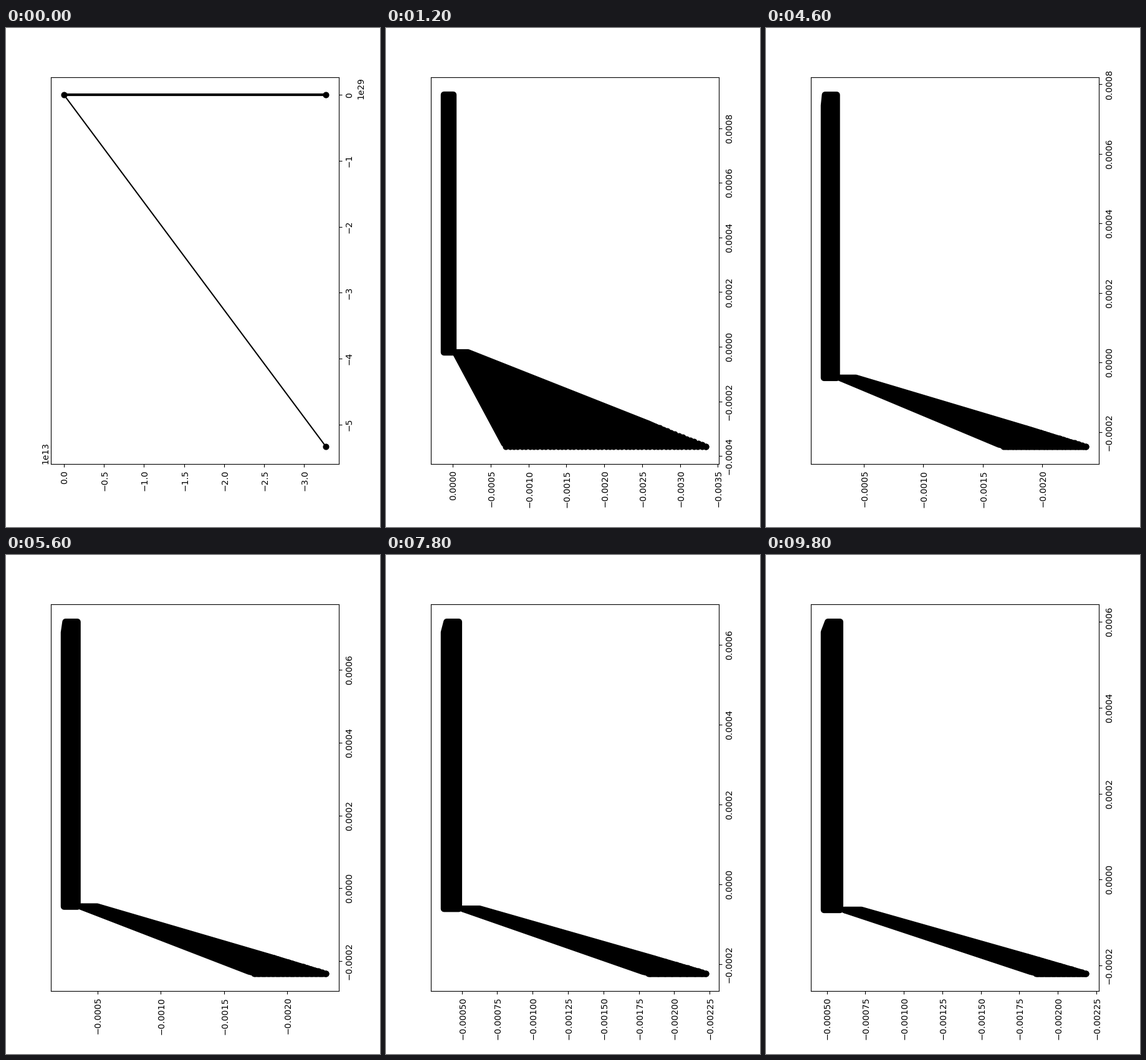
Animation of 600x800 px, one loop 10 s. Source, as a matplotlib script:

```python
import numpy as np
import matplotlib.pyplot as plt
from matplotlib.animation import FuncAnimation
from matplotlib.patches import Polygon

FRAMES, STEP_MS = 50, 200
STROKE = 7.5  # outline width of the solid shapes, in points

plt.rcParams["font.family"] = "DejaVu Sans"
fig = plt.figure(figsize=(6, 8), dpi=100, facecolor="white")
ax = fig.add_axes([72 / 600, 101 / 800, 462 / 600, 620 / 800])
ax.yaxis.tick_right()
for axis in (ax.xaxis, ax.yaxis):
    axis.get_offset_text().set_visible(False)


def solid():
    shape = Polygon(np.zeros((3, 2)), facecolor="black", edgecolor="black",
                    linewidth=STROKE, joinstyle="round")
    return ax.add_patch(shape)


def power(x, y, text, ha):
    return fig.text(x / 600, y / 800, text, rotation=90, ha=ha,
                    va="baseline", rotation_mode="anchor")


bar, arm = solid(), solid()
dots, = ax.plot([], [], "ko", ms=6.3)
thick, = ax.plot([], [], "k-", lw=3)
thin, = ax.plot([], [], "k-", lw=1.5)
powers = [power(67.8, 101, "1e13", "left"), power(573.3, 721, "1e29", "right")]


def fit_view(right, left, bottom, top):
    """Limits with a 5% margin; the horizontal axis grows to the left."""
    mx, my = 0.05 * (left - right), 0.05 * (top - bottom)
    ax.set_xlim(left + mx, right - mx)
    ax.set_ylim(bottom - my, top + my)
    for label in ax.get_xticklabels():
        label.set(rotation=90, rotation_mode="anchor", ha="right",
                  va="center_baseline")
    for label in ax.get_yticklabels():
        label.set(rotation=90, rotation_mode="anchor", ha="center", va="top")


def draw_singular():
    far, low = -3.27e13, -5.33e29
    dots.set_data([0, far, far], [0, 0, low])
    thick.set_data([0, far], [0, 0])
    thin.set_data([0, far], [0, low])
    fit_view(far, 0, low, 0)


def draw_shape(k):
    # bar
    top = 1 / (1013.9 + 11.57 * k + 0.0358 * k * k)
    left = 1.854 * top - 0.001594
    right = left - (0.000102 + 0.00012 / k)
    base = -2.06e-5 - 0.155 * (0.000922 - top)
    cut = 6.2e-7 * max(0, k - 8)
    bar.set_xy([(left, base), (right, base), (right, top),
                (left - cut, top), (left, 0.96 * top)])

    # arm: v runs across it, t runs from the bar to its far end
    near_l = right - 0.000027
    near_r = left - (0.00027 - 6.8e-7 * k + 0.0003 / k)
    far_l = -0.00202 + 0.00792 / k
    far_r = -0.00202 - 0.00792 / k
    low = -(0.000198 + 0.001 / k)

    def at(v, t):
        near = near_l + (near_r - near_l) * v
        far = far_l + (far_r - far_l) * v
        return near + (far - near) * t, base + (low - base) * t

    arm.set_xy([at(0, 0), at(1, 0), at(1, 0.76), at(0.97, 0.985),
                at(0.02, 0.985), at(0, 0.97)])

    # beaded far end and right edge
    row, edge = np.linspace(0, 1, 51), np.linspace(0.74, 1, 17)
    v = np.append(row, np.ones_like(edge))
    t = np.append(np.ones_like(row), edge)
    dots.set_data(*at(v, t))
    fit_view(far_r, max(left, far_l), low, top)


def draw(k):
    first = k == 0
    for item in (thick, thin, *powers):
        item.set_visible(first)
    for item in (bar, arm):
        item.set_visible(not first)
    if first:
        draw_singular()
    else:
        draw_shape(k)
    return bar, arm, dots, thick, thin


anim = FuncAnimation(fig, draw, frames=FRAMES, interval=STEP_MS,
                     init_func=lambda: draw(0), repeat=True, repeat_delay=0,
                     blit=False)
plt.show()
```
